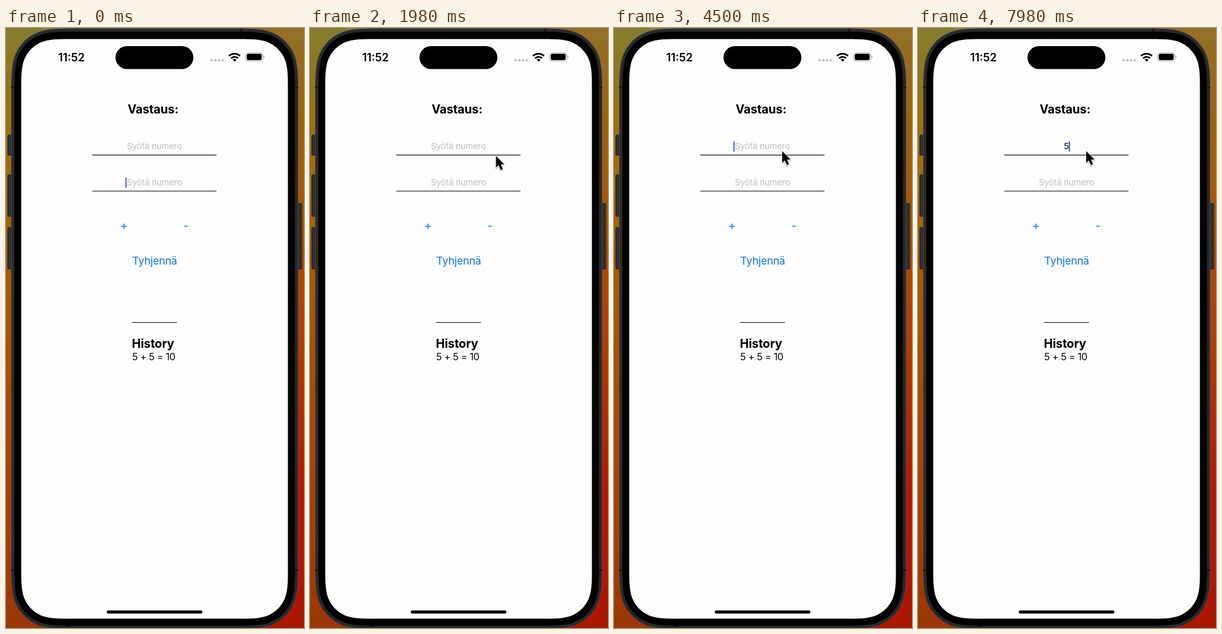
These frames come from a looping animation (528x1060 px, 8 s). An HTML page:

```html
<!DOCTYPE html>
<html lang="fi">
<head>
<meta charset="utf-8">
<title>Calculator</title>
<style>
html, body { margin: 0; width: 100%; height: 100%; overflow: hidden; background: #a04a00; }
svg { display: block; width: 528px; height: 1060px; font-family: Inter, "Open Sans", sans-serif; }
.bold { font-size: 21.2px; font-weight: 700; letter-spacing: -.1px; }
.hint { font-size: 15px; letter-spacing: -.05px; fill: #bdbdc1; }
.link { font-size: 18.8px; letter-spacing: -.2px; fill: #0c76dc; }
.mid { text-anchor: middle; }
</style>
</head>
<body>
<svg viewBox="0 0 528 1060">
  <defs>
    <linearGradient id="left" x2="0" y2="1">
      <stop stop-color="#857c30"/><stop offset=".1" stop-color="#967514"/>
      <stop offset=".2" stop-color="#a36c0a"/><stop offset=".42" stop-color="#aa5900"/>
      <stop offset=".7" stop-color="#a94500"/><stop offset="1" stop-color="#9c3604"/>
    </linearGradient>
    <linearGradient id="right" x2="0" y2="1">
      <stop stop-color="#92702a"/><stop offset=".1" stop-color="#9e6814"/>
      <stop offset=".2" stop-color="#a55e08"/><stop offset=".5" stop-color="#b04000"/>
      <stop offset=".76" stop-color="#b61b00"/><stop offset="1" stop-color="#ac1700"/>
    </linearGradient>
    <filter id="soft" x="-50%" y="-50%" width="200%" height="200%">
      <feDropShadow dx="0" dy="1.5" stdDeviation="1.5" flood-opacity=".35"/>
    </filter>
  </defs>

  <rect width="264" height="1060" fill="url(#left)"/>
  <rect x="264" width="264" height="1060" fill="url(#right)"/>

  <!-- Phone body -->
  <g fill="#2f2f32" stroke="#1d1d1f" stroke-width=".8">
    <rect x="3" y="189" width="8" height="36" rx="1.5"/>
    <rect x="3" y="259" width="8" height="74" rx="1.5"/>
    <rect x="3" y="352" width="8" height="74" rx="1.5"/>
    <rect x="516" y="310" width="8" height="116" rx="1.5"/>
  </g>
  <path id="body" fill="#29292c" stroke="#4b4b50"/>
  <path d="M9 105h7M511 105h7M9 958h7M511 958h7M417 1v6M111 1055v6" stroke="#19191b" stroke-width="4"/>
  <path id="bezel"/>
  <path id="screen" fill="#fdfdfd"/>
  <rect x="194" y="32" width="138" height="40.5" rx="20.2"/>
  <rect x="178.5" y="1029" width="169.5" height="5.5" rx="2.7"/>

  <!-- Status bar -->
  <text class="mid" x="116" y="58.7" font-size="19.6" font-weight="600">11:52</text>
  <g fill="#c5c5c8">
    <circle cx="364.3" cy="57" r="2.3"/><circle cx="370.8" cy="57" r="2.3"/>
    <circle cx="377.4" cy="57" r="2.3"/><circle cx="384" cy="57" r="2.3"/>
  </g>
  <g fill="none" stroke="#000" stroke-width="3">
    <path d="M395.3 49.4a14 14 0 0 1 19.4 0M399 53.4a8.7 8.7 0 0 1 12 0"/>
  </g>
  <path d="M405 59.5l-3.3-3.4a4.7 4.7 0 0 1 6.6 0z"/>
  <rect x="424.5" y="43.7" width="30.5" height="15" rx="4.8" fill="none" stroke="#a6a6a8" stroke-width="1.1"/>
  <rect x="426.5" y="45.6" width="26.5" height="11.2" rx="3"/>
  <path d="M456.3 48.8a2.6 2.6 0 0 1 0 5z" fill="#a6a6a8"/>

  <!-- Form -->
  <text class="bold mid" x="260.5" y="151">Vastaus:</text>
  <text class="hint mid" id="first" x="263" y="214.3">Syötä numero</text>
  <text class="hint mid" x="263" y="278.3">Syötä numero</text>
  <path d="M153 224.5h220M153 288.2h220M223 520.3h80" stroke="#25251a" stroke-width="1.3"/>
  <g class="link mid">
    <text x="208.7" y="355.7" font-size="20">+</text>
    <text x="318.7" y="355.5">-</text>
    <text x="263.5" y="418">Tyhjennä</text>
  </g>
  <text class="bold" x="223" y="564.8">History</text>
  <text x="223.5" y="586.5" font-size="17" letter-spacing="-.3">5 + 5 = 10</text>

  <rect id="caret" width="2.2" height="18.5" rx="1" fill="#4a5bc2"/>
  <path id="pointer" d="M0 0V20.5L4.7 16.4 8.4 25 12.2 23.3 8.6 15H14.8Z" stroke="#fff" stroke-width="1.5"
    paint-order="stroke" stroke-linejoin="round" filter="url(#soft)"/>
</svg>
<script>
const LOOP = 8000, FOCUS = 3900, TYPED = 7500, SHOW = 1660;
const BLINK = 1200, LIT = 730, FADE = 40;
const $ = id => document.getElementById(id);
const first = $('first'), caret = $('caret'), pointer = $('pointer');

// Rectangle whose straight sides ease gradually into each corner of radius r
function smoothRect(x, y, w, h, r) {
  const corner = (cx, cy, ax, ay) => {
    // u runs back along the incoming side, v along the outgoing one
    const at = (u, v) => [cx - r * (u * ax - v * -ay), cy - r * (u * ay - v * ax)].join(' ');
    return `L${at(1.529, 0)}C${at(1.088, 0)} ${at(.868, 0)} ${at(.631, .075)}` +
      `C${at(.373, .169)} ${at(.169, .373)} ${at(.075, .631)}` +
      `C${at(0, .868)} ${at(0, 1.088)} ${at(0, 1.529)}`;
  };
  return (corner(x + w, y, 1, 0) + corner(x + w, y + h, 0, 1) +
    corner(x, y + h, -1, 0) + corner(x, y, 0, -1)).replace('L', 'M') + 'Z';
}
$('body').setAttribute('d', smoothRect(9.5, 1, 508, 1060.5, 78));
$('bezel').setAttribute('d', smoothRect(15, 6.5, 497, 1049.5, 72.5));
$('screen').setAttribute('d', smoothRect(27, 19.5, 472.5, 1024, 60.5));

// Pointer stops: time, x, y
const path = [[1660, 352, 216], [1960, 329.5, 226], [2450, 329.5, 226],
  [2850, 301, 248], [3400, 301, 248], [3800, 298, 217.5], [8000, 298, 217.5]];

const clamp = v => Math.max(0, Math.min(1, v));
const ease = v => v * v * (3 - 2 * v);

function pointerAt(t) {
  const i = Math.max(1, path.findIndex(p => p[0] > t));
  const [a, b] = [path[i - 1], path[i]];
  const k = ease(clamp((t - a[0]) / (b[0] - a[0])));
  return [1, 2].map(n => a[n] + (b[n] - a[n]) * k);
}

function blink(age) {
  const t = age % BLINK;
  return t < LIT ? 1 : Math.max(clamp(1 - (t - LIT) / FADE), clamp((t - BLINK + FADE) / FADE));
}

function draw(now) {
  const t = now % LOOP, typed = t >= TYPED;
  first.textContent = typed ? '5' : 'Syötä numero';
  first.style.fill = typed ? '#000' : '';
  caret.setAttribute('x', typed ? 267 : 211.5);
  caret.setAttribute('y', t < FOCUS ? 263.7 : 199.8);
  caret.setAttribute('opacity', blink(t - (typed ? TYPED : t < FOCUS ? 0 : FOCUS)));
  pointer.setAttribute('visibility', t < SHOW ? 'hidden' : 'visible');
  pointer.setAttribute('transform', `translate(${pointerAt(t)})`);
  requestAnimationFrame(draw);
}
draw(0);
</script>
</body>
</html>
```
